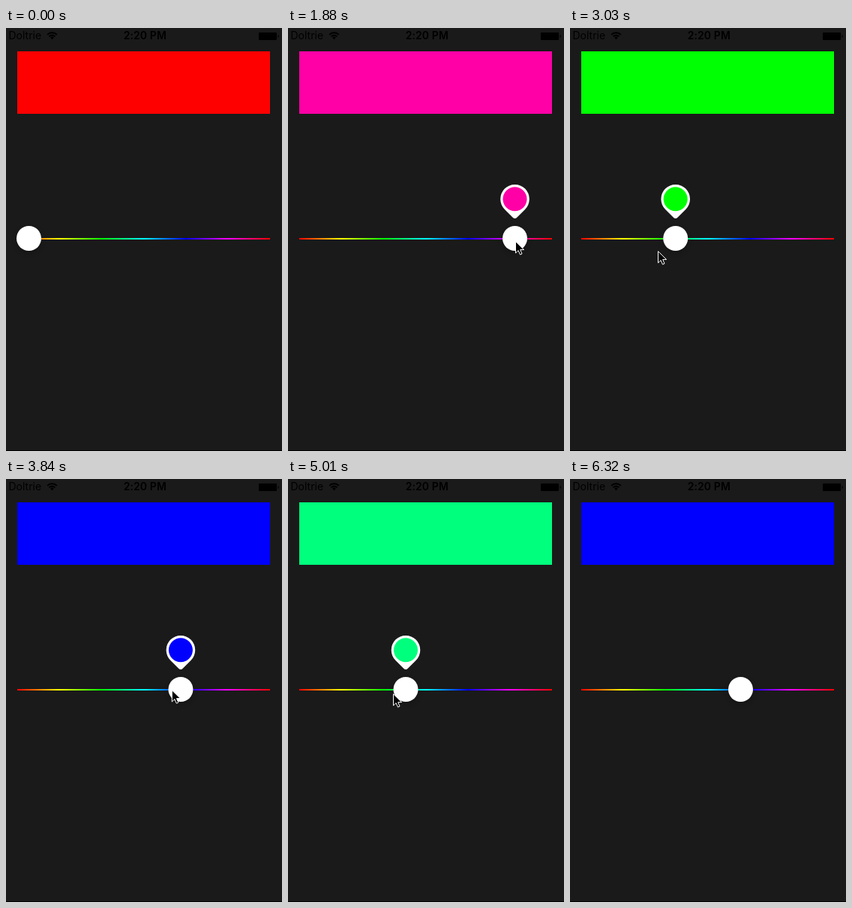
These frames come from a looping animation (368x562 px, 6.91 s). An HTML page:

```html
<!DOCTYPE html>
<html lang="en">
<head>
<meta charset="utf-8">
<title>Color slider</title>
<style>
  html, body { margin: 0; width: 100%; height: 100%; overflow: hidden; background: #1a1a1a; }
  svg { display: block; width: 100%; height: 100%; }
  text { font: 14px Inter, Roboto, sans-serif; fill: #000; }
  .clock { font-weight: 600; letter-spacing: .1px; text-anchor: middle; }
  #thumb { filter: drop-shadow(0 3px 3px rgba(0, 0, 0, .22)); }
</style>
</head>
<body>
<svg viewBox="0 0 368 562">
  <defs>
    <linearGradient id="spectrum" gradientUnits="userSpaceOnUse" x1="15" y1="0" x2="352" y2="0"></linearGradient>
  </defs>
  <rect width="368" height="562" fill="#1a1a1a"/>
  <rect y="561" width="368" height="1" fill="#000"/>

  <!-- status bar -->
  <text x="3.5" y="15">Doltrie</text>
  <g transform="translate(-.5 0)" fill="none" stroke="#000" stroke-width="2">
    <path d="M55.6 8.9A9 9 0 0 1 68.4 8.9M58 11.4A5.6 5.6 0 0 1 66 11.4"/>
    <path d="M62 15.2L59.7 12.8A3.2 3.2 0 0 1 64.3 12.8Z" fill="#000" stroke="none"/>
  </g>
  <text class="clock" x="185.3" y="15">2:20 PM</text>
  <rect x="337" y="6" width="24" height="10" rx="1"/>
  <path d="M362.6 9v4a2.2 2.2 0 0 0 0-4Z"/>

  <rect id="swatch" x="15" y="31" width="337" height="83"/>
  <rect x="15" y="279" width="337" height="2" fill="url(#spectrum)"/>
  <circle id="thumb" cy="279.5" r="16.5" fill="#fff"/>
  <g id="popup">
    <path d="M-13.6 240.9A19.3 19.3 0 1 1 13.6 240.9L3 251.5Q0 254.5 -3 251.5Z" fill="#fff"/>
    <circle id="chip" cy="227.3" r="16"/>
  </g>
  <path id="cursor" d="M.5 .7V16L4.1 12.6L6.5 18.1L9 17L6.7 11.6H11.6Z"
        fill="#000" stroke="#fff" stroke-width="1" stroke-linejoin="round"/>
</svg>
<script>
const LOOP = 6910;
const STEP = 115;
const APPEAR = 380;
const LEAVE = APPEAR + 51 * STEP;
const MIN_X = 30.5, MAX_X = 335.5;
const $ = id => document.getElementById(id);

const start = { thumb: MIN_X, x: 349, y: 330 };

// Each gesture eases from the pose before it; from and to count refresh steps
const gestures = [
  { from: 0,  to: 6,  thumb: MIN_X, x: 14,  y: 284 },
  { from: 6,  to: 8,  thumb: 144.3, x: 125, y: 281 },
  { from: 8,  to: 13, thumb: 302.5, x: 303, y: 283 },
  { from: 13, to: 23, thumb: 140.7, x: 117, y: 296 },
  { from: 27, to: 31, thumb: 250,   x: 240, y: 277 },
  { from: 32, to: 35, thumb: MAX_X, x: 339, y: 264 },
  { from: 36, to: 40, thumb: 157,   x: 140, y: 285 },
  { from: 42, to: 46, thumb: 227.5, x: 212, y: 283 },
  { from: 48, to: 51, thumb: 227.5, x: 265, y: 470 }
];

const mix = (a, b, k) => a + (b - a) * k;
const within = (n, from, to) => n >= from && n < to;
const show = (el, on) => el.setAttribute("visibility", on ? "visible" : "hidden");
const move = (el, x, y) => el.setAttribute("transform", `translate(${x} ${y})`);

function ease(k) {
  k = Math.min(1, Math.max(0, k));
  return k * k * (3 - 2 * k);
}

function poseAt(step) {
  return gestures.reduce((pose, g) => {
    const k = ease((step - g.from) / (g.to - g.from));
    return {
      thumb: mix(pose.thumb, g.thumb, k),
      x: mix(pose.x, g.x, k),
      y: mix(pose.y, g.y, k)
    };
  }, start);
}

// Hue along the slider, drawn softly to the nearest pure color
function hueAt(x) {
  const hue = 360 * (x - MIN_X) / (MAX_X - MIN_X);
  const pure = Math.round(hue / 60) * 60;
  const off = hue - pure;
  return pure + off * (1 - Math.exp(-((off / 14) ** 8)));
}

function draw(time) {
  const step = Math.floor((time - APPEAR) / STEP);
  const pose = poseAt(step);
  const color = `hsl(${hueAt(pose.thumb)}, 100%, 50%)`;
  $("swatch").setAttribute("fill", color);
  $("chip").setAttribute("fill", color);
  $("thumb").setAttribute("cx", pose.thumb);
  move($("popup"), pose.thumb, 0);
  move($("cursor"), pose.x, pose.y);
  show($("popup"), within(step, 7, 26) || within(step, 28, 49));
  show($("cursor"), within(time, APPEAR, LEAVE));
}

$("spectrum").innerHTML = Array.from({ length: 7 }, (_, i) =>
  `<stop offset="${i / 6}" stop-color="hsl(${i * 60}, 100%, 50%)"/>`).join("");

const begin = performance.now();
function frame() {
  draw((performance.now() - begin) % LOOP);
  requestAnimationFrame(frame);
}
frame();
</script>
</body>
</html>
```
